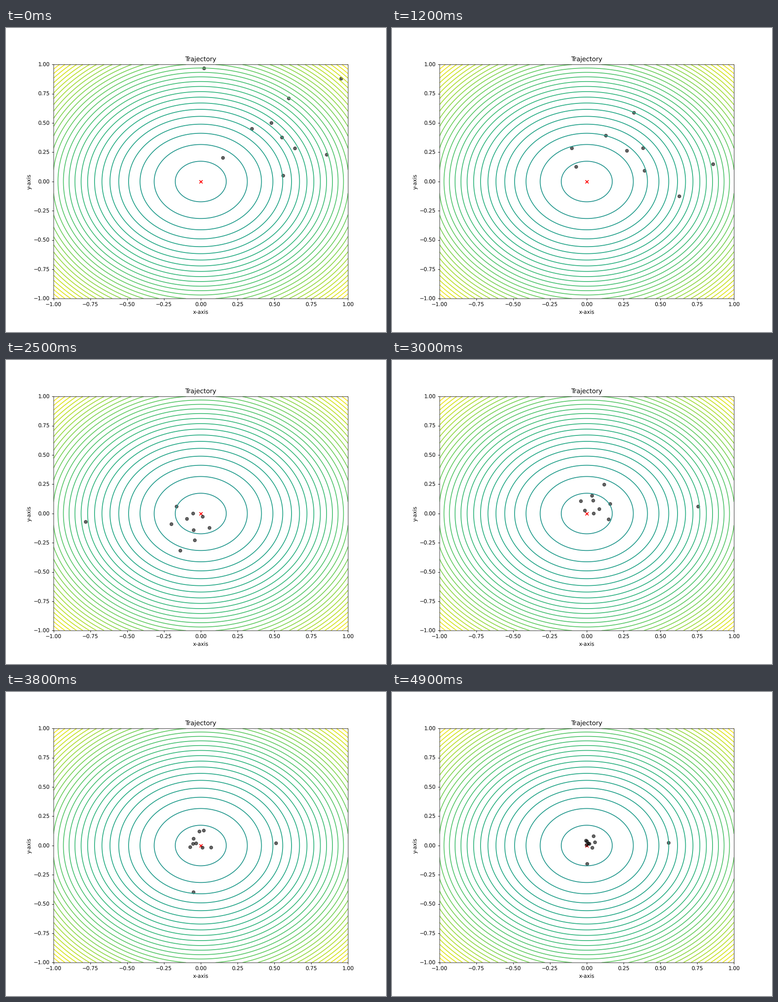
Animation, 837 px wide and 669 px high, one loop 5 s. Source, as a matplotlib script:

```python
import numpy as np
import matplotlib.pyplot as plt
from matplotlib.animation import FuncAnimation
from matplotlib.patches import Rectangle

WIDTH, HEIGHT, DPI = 837, 669, 83.7
FRAMES, INTERVAL = 50, 100
TURN = 6  # frame of the first return

plt.rcParams["text.hinting"] = "none"

# Where each particle starts and where its first swing brings it
START = np.array([
    (.856, .229), (.023, .967), (.954, .879), (.598, .710), (.640, .283),
    (.560, .050), (.552, .376), (.480, .500), (.151, .202), (.348, .450)])
RETURN = np.array([
    (-.749, -.152), (-.253, -.866), (-.290, -.660), (-.096, -.509), (-.557, .151),
    (-.336, -.101), (-.416, -.257), (-.222, -.291), (.072, -.105), (.157, -.276)])

# Swings die down at the same rate, except for two long-lived ones
rng = np.random.default_rng(4)
period = rng.uniform(8.8, 9.8, START.shape)
decay = np.full(START.shape, 0.95)
period[0, 0], decay[0, 0] = 9.2, 0.99
period[1, 1], decay[1, 1] = 10, 0.96


def pull_away(t):
    """Fading memory of the starting point."""
    return START * 0.6**t


def wave(t):
    return decay**t * np.sin(2 * np.pi * t / period)


amplitude = (RETURN - pull_away(TURN)) / wave(TURN)


def positions(t):
    return pull_away(t) + amplitude * wave(t)


# The small margin keeps the pixel size from rounding down
fig = plt.figure(figsize=((WIDTH + 1e-6) / DPI, (HEIGHT + 1e-6) / DPI), dpi=DPI)
ax = fig.add_axes([0.125, 0.11, 0.775, 0.77])
ax.set_title("Trajectory", fontsize=12)
ax.set_xlabel("x-axis", fontsize=10)
ax.set_ylabel("y-axis", fontsize=10)
ax.set_xlim(-1, 1)
ax.set_ylim(-1, 1)

# Soft-edged frame, not snapped to whole pixels
ax.spines[:].set_visible(False)
fig.add_artist(Rectangle((0.1255, 0.1094), 0.775, 0.77, fill=False,
                         linewidth=0.72, snap=False))

grid = np.linspace(-1, 1, 401)
xx, yy = np.meshgrid(grid, grid)
ax.contour(xx, yy, xx**2 + yy**2, levels=np.arange(-2, 2, 0.07), cmap="viridis")
ax.scatter(0, 0, color="red", marker="x")

# One colour per dot keeps the dots at fractional pixel positions
black = ["black"] * len(START)
dots = ax.scatter(*START.T, c=black, edgecolors=black, alpha=0.6)


def update(frame):
    dots.set_offsets(positions(frame))
    return (dots,)


anim = FuncAnimation(fig, update, frames=FRAMES, interval=INTERVAL,
                     repeat=True, repeat_delay=0)
plt.show()
```
